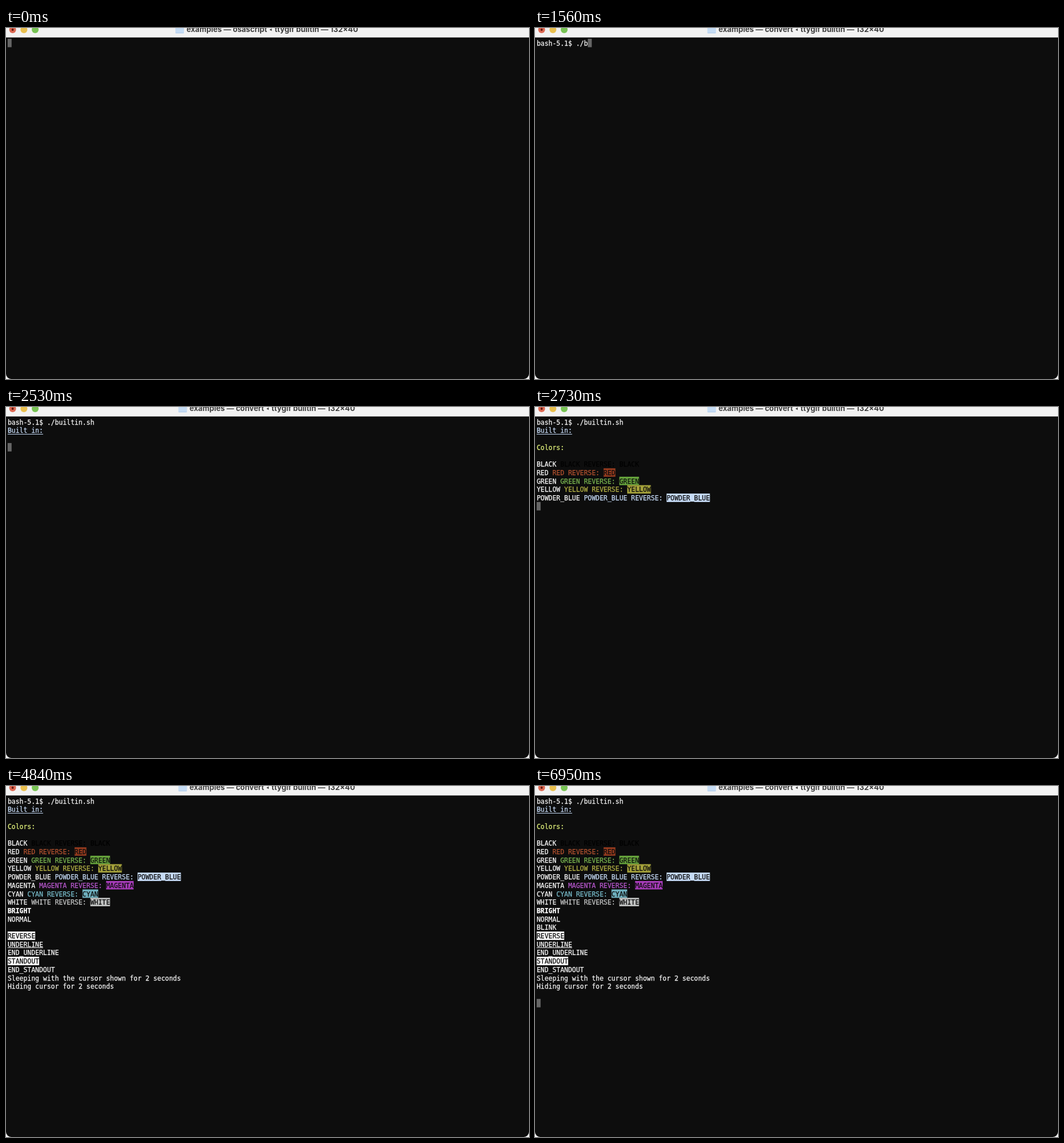
An HTML page with a canvas for the animation above (8000 ms loop, 914 px wide and 613 px high).

```html
<!DOCTYPE html>
<html lang="en">
<head>
<meta charset="utf-8">
<title>Terminal</title>
<style>
html, body { margin: 0; width: 100%; height: 100%; overflow: hidden; background: #fff; }
canvas { display: block; }
</style>
</head>
<body>
<canvas id="stage" width="914" height="613"></canvas>
<script>
const ctx = document.getElementById('stage').getContext('2d');
const LOOP = 8000, LEFT = 2.9, TOP = 18.8, CELL = 6.88, LINE = 14.71;
const MONO = '11.4px "DejaVu Sans Mono", monospace';
const SANS = '700 13.1px Inter, sans-serif';
const BG = '#0d0d0d', FG = '#f8f8f8', POWDER = '#c6dbf7';

// A run is [text, colour, style]
const swatch = (name, color, fill = color) => [
  [name + ' ', FG], [name + ' REVERSE: ', color], [name, fill, 'reverse']
];
const COMMAND = 'bash-5.1$ ./builtin.sh ';
const OUTPUT = [
  [['Built in:', POWDER, 'underline']],
  [],
  [['Colors:', '#e4f47c']],
  [],
  [['BLACK ', FG], ['BLACK REVERSE: BLACK', '#000']],
  swatch('RED', '#b1512f', '#943a1e'),
  swatch('GREEN', '#79b450', '#67a53c'),
  swatch('YELLOW', '#b2b045', '#a3a03a'),
  swatch('POWDER_BLUE', POWDER),
  swatch('MAGENTA', '#b858ce', '#a63bb9'),
  swatch('CYAN', '#78bccb', '#6eafbd'),
  swatch('WHITE', '#c5c6c6', '#bfc1c0'),
  [['BRIGHT', '#fff', 'bold']],
  [['NORMAL', FG]],
  [['BLINK', FG]],
  [['REVERSE', '#fff', 'reverse']],
  [['UNDERLINE', FG, 'underline']],
  [['END_UNDERLINE', FG]],
  [['STANDOUT', '#fff', 'reverse']],
  [['END_STANDOUT', FG]],
  [['Sleeping with the cursor shown for 2 seconds', FG]],
  [['Hiding cursor for 2 seconds', FG]]
];
const BLINK_ROW = 15;

// at: start time, typed: command characters, rows: output lines, cur: cursor [row, column]
const STEPS = [
  { at: 0, typed: 0, rows: 0, cur: [0, 0] },
  { at: 1240, typed: 11, rows: 0, cur: [0, 11] },
  { at: 1430, typed: 12, rows: 0, cur: [0, 12] },
  { at: 1560, typed: 13, rows: 0, cur: [0, 13] },
  { at: 1820, typed: 14, rows: 0, cur: [0, 14] },
  { at: 1990, typed: 23, rows: 0, cur: [0, 23] },
  { at: 2470, typed: 23, rows: 0, cur: [1, 0] },
  { at: 2530, typed: 23, rows: 2, cur: [3, 0] },
  { at: 2730, typed: 23, rows: 9, cur: [10, 0] },
  { at: 2830, typed: 23, rows: 16, cur: [17, 0] },
  { at: 4840, typed: 23, rows: 22, blinkOff: true },
  { at: 6850, typed: 23, rows: 22, cur: [23, 0] },
  { at: 6950, typed: 23, rows: 22, cur: [24, 0] }
];

function box(x, y, w, h, color) {
  ctx.fillStyle = color;
  ctx.fillRect(x, y, w, h);
}

function disc(x, y, r, color) {
  ctx.fillStyle = color;
  ctx.beginPath();
  ctx.arc(x, y, r, 0, Math.PI * 2);
  ctx.fill();
}

function drawRow(row, runs) {
  const y = TOP + row * LINE;
  let x = LEFT;
  for (const [text, color, style] of runs) {
    const width = text.length * CELL;
    if (style === 'reverse') box(x, y, width, LINE, color);
    if (style === 'underline') box(x, Math.round(y + 13), width, 1, color);
    ctx.font = (style === 'bold' ? 'bold ' : '') + MONO;
    ctx.fillStyle = ctx.strokeStyle = style === 'reverse' ? BG : color;
    ctx.lineWidth = 0.25; // slightly heavier strokes, as with font smoothing
    [...text].forEach((ch, i) => {
      ctx.fillText(ch, x + i * CELL, y + 11.9);
      ctx.strokeText(ch, x + i * CELL, y + 11.9);
    });
    x += width;
  }
}

function drawTitle(process) {
  const left = `examples — ${process}`, right = 'ttygif builtin — 132×40', gap = 13;
  ctx.font = SANS;
  const leftWidth = ctx.measureText(left).width;
  const x = 465.4 - (leftWidth + gap + ctx.measureText(right).width) / 2;
  const mid = x + leftWidth;
  ctx.fillStyle = '#3d3d3d';
  ctx.fillText(left, x, 7);
  ctx.fillText(right, mid + gap, 7);
  ctx.beginPath();
  ctx.moveTo(mid + 4, 3);
  ctx.lineTo(mid + 8, 0.8);
  ctx.lineTo(mid + 8, 5.2);
  ctx.fill();
  ctx.fillStyle = '#c5dcf4';
  ctx.beginPath();
  ctx.roundRect(x - 19.5, -4, 15, 13.5, 1.5);
  ctx.fill();
  box(x - 19, 8, 14, 1, '#b4cdea');
}

function drawWindow(process) {
  box(0, 0, 914, 613, '#fff');
  ctx.fillStyle = BG;
  ctx.beginPath();
  ctx.roundRect(0, 0, 914, 613, [0, 0, 9, 9]);
  ctx.fill();
  box(0, 0, 914, 16, '#f2f2f2');
  box(0, 16, 914, 1, '#868686');
  ['#dd6a54', '#e9bf4e', '#78c354'].forEach((c, i) => disc(11.6 + i * 19.7, 3, 6, c));
  disc(11.6, 3, 2, '#641a10');
  drawTitle(process);
}

function draw(t) {
  const step = STEPS.findLast(s => s.at <= t);
  drawWindow(step.typed ? 'convert' : 'osascript');
  if (step.cur) {
    const [row, col] = step.cur;
    box(LEFT + col * CELL, TOP + row * LINE, CELL, LINE, '#656565');
  }
  drawRow(0, [[COMMAND.slice(0, step.typed), FG]]);
  OUTPUT.slice(0, step.rows).forEach((runs, i) => {
    if (!(step.blinkOff && i + 1 === BLINK_ROW)) drawRow(i + 1, runs);
  });
}

const start = performance.now();
function tick() {
  draw((performance.now() - start) % LOOP);
  requestAnimationFrame(tick);
}
tick();
</script>
</body>
</html>
```
